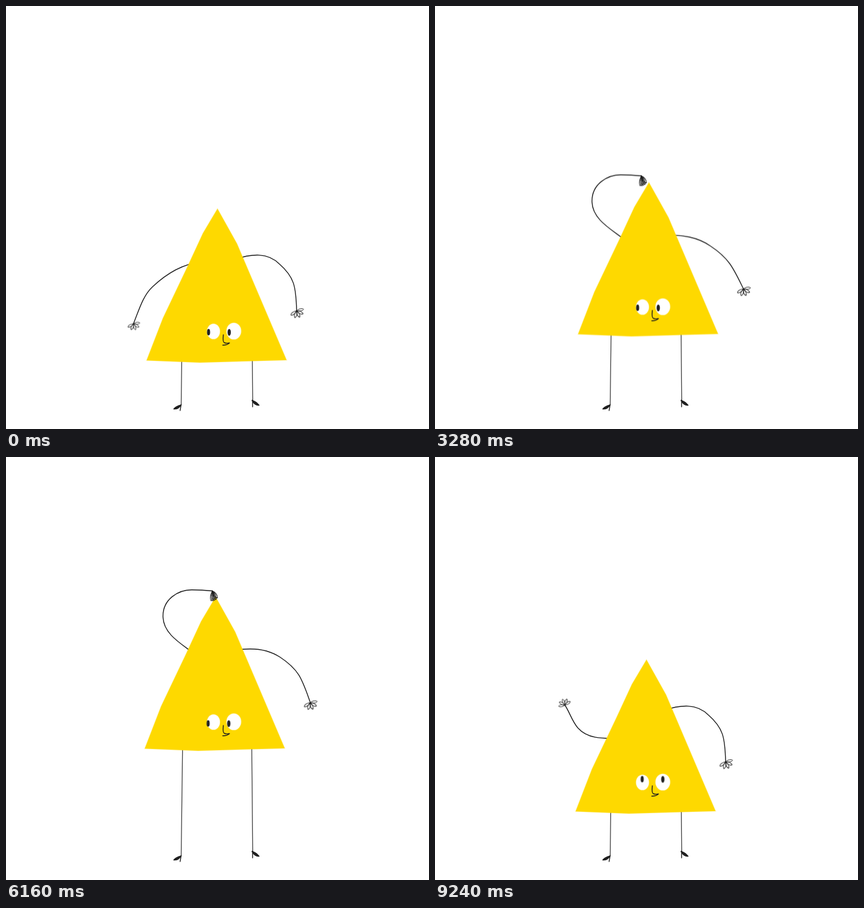
Recreate the animation shown at these times as an HTML page without scripts. Size 687x687 px, loop 9320 ms.

```html
<!DOCTYPE html>
<html lang="en">
<head>
<meta charset="utf-8">
<title>Stretching triangle</title>
<style>
@property --spread { syntax: "<angle>"; inherits: true; initial-value: 39deg; }

html, body { margin: 0; width: 100%; height: 100%; overflow: hidden; background: #fff; }
svg { display: block; width: 100vw; height: 100vh; }
.line { fill: none; stroke: #1d1d1d; stroke-width: 1.4; stroke-linecap: round; stroke-linejoin: round; }
.hand { stroke-width: 1; }
.leg { stroke: #444; stroke-width: 1.3; }
.ink { fill: #222; }
.soft { stroke-width: 1.6; stroke-opacity: .35; }
.finger { transform: rotate(calc(78deg + var(--i) * var(--spread))); }
.lift, .body, .pupils, .arm, .hand { animation: 9.32s ease-in-out infinite; }

.lift { animation-name: lift; animation-timing-function: linear; }
@keyframes lift {
  0%, 19.31% { transform: translateY(0); }
  27.04% { transform: translateY(-2px); }
  29.18% { transform: translateY(-15px); }
  39.48% { transform: translateY(-57px); }
  43.35% { transform: translateY(-76px); }
  49.79% { transform: translateY(-95px); }
  53% { transform: translateY(-99px); }
  57.51% { transform: translateY(-97px); }
  62% { transform: translateY(-95px); }
  66.09% { transform: translateY(-98px); }
  72% { transform: translateY(-99px); }
  78.11% { transform: translateY(-96px); }
  81.12% { transform: translateY(-98px); animation-timing-function: ease-out; }
  84.5% { transform: translateY(-112px); animation-timing-function: ease-in; }
  88% { transform: translateY(6px); }
  90% { transform: translateY(-3px); }
  91%, 100% { transform: translateY(0); }
}

.body { animation-name: wobble; }
@keyframes wobble {
  0%, 19.31% { transform: translate(0, 0); }
  22.5% { transform: translate(-15px, -2px); }
  27.04% { transform: translate(3px, -1px); }
  31% { transform: translate(-8px, -5px); }
  35% { transform: translate(4px, -3px); }
  39.5% { transform: translate(-8px, -7px); }
  43.35% { transform: translate(-2px, -7px); }
  46% { transform: translate(4px, -4px); }
  50.5% { transform: translate(-8px, -6px); }
  54% { transform: translate(4px, -4px); }
  57.51% { transform: translate(-7px, -6px); }
  62% { transform: translate(4px, -4px); }
  66.09% { transform: translate(-3px, -4px); }
  69% { transform: translate(-8px, -6px); }
  72.5% { transform: translate(4px, -3px); }
  75.5% { transform: translate(-8px, -5px); }
  78.11% { transform: translate(-.7px, -3.5px); }
  81% { transform: translate(3px, -3px); }
  86%, 100% { transform: translate(0, 0); }
}

.pupils { animation-name: roll; animation-timing-function: linear; }
@keyframes roll {
  0%, 4.72% { transform: translate(-8px, 1px); }
  11.16%, 19.31% { transform: translate(-.5px, -5.5px); }
  23% { transform: translate(6px, 0); }
  27.04% { transform: translate(0, 5.5px); }
  35% { transform: translate(-8px, 1px); }
  43.35% { transform: translate(-4.7px, -3.5px); }
  45.5% { transform: translate(-.5px, -5.5px); }
  51% { transform: translate(6px, 0); }
  57.51% { transform: translate(0, 5.5px); }
  66.09% { transform: translate(-8.7px, 2px); }
  78.11%, 100% { transform: translate(-.5px, -5.5px); }
}

.arm.left { animation-name: left-arm; }
@keyframes left-arm {
  0%, 4.72% { d: path("M315 416C280 420 254 441 238 456C222 471 216 494 207 516"); }
  7.5% { d: path("M315 417C250 420 180 412 140 406C100 400 70 396 46 392"); }
  11.16%, 81.12% { d: path("M310 421C290 404 256 388 255 358C254 329 280 313.500 302 313.700C312 313.800 325 314.500 335 315.500"); }
  84.5% { d: path("M310 425C280 400 240 370 225 345C210 325 200 312 192 300"); }
  88% { d: path("M304 452C270 452 240 445 222 424C210 410 204 395 196 380"); }
  91%, 100% { d: path("M300 456.500C270 458 247 457 232 440C222 428 219 415 211 403"); }
}

.hand.left { animation-name: left-hand; }
@keyframes left-hand {
  0%, 4.72% { transform: translate(207px, 516px) rotate(0deg) scale(.9, .9); --spread: 39deg; }
  7.5% { transform: translate(46px, 392px) rotate(95deg) scale(.9, .9); --spread: 39deg; }
  11.16%, 81.12% { transform: translate(335px, 315.5px) rotate(360deg) scale(1, 1.4); --spread: 14deg; }
  84.5% { transform: translate(192px, 300px) rotate(510deg) scale(.9, .9); --spread: 39deg; }
  88% { transform: translate(196px, 380px) rotate(520deg) scale(.9, .9); --spread: 39deg; }
  91%, 99.13% { transform: translate(211px, 403px) rotate(540deg) scale(.9, .9); --spread: 39deg; }
  99.14%, 100% { transform: translate(211px, 403px) rotate(537deg) scale(.9, .9); --spread: 39deg; }
}

.arm.right { animation-name: right-arm; }
@keyframes right-arm {
  0%, 4.72% { d: path("M370 412C400 402 425 400 444 419C468 440 471 455 472 495"); }
  11.16%, 27.04% { d: path("M375 413C400 413 430 421 450 436C480 456 489 473 508 502"); }
  43.35%, 81.12% { d: path("M372 412C400 407 425 410 445 423C477 444 481 460 494 496"); }
  86% { d: path("M372 412C400 405 440 405 470 405C500 403 525 402 544 398"); }
  91%, 100% { d: path("M370 412C400 402 425 400 444 419C468 440 471 455 472 495"); }
}

.hand.right { animation-name: right-hand; }
@keyframes right-hand {
  0%, 4.72% { transform: translate(472px, 495px) rotate(-6deg); }
  11.16%, 27.04% { transform: translate(508px, 501px) rotate(0deg); }
  43.35%, 81.12% { transform: translate(494px, 497px) rotate(-3deg); }
  86% { transform: translate(544px, 398px) rotate(-90deg); }
  91%, 100% { transform: translate(472px, 495px) rotate(-6deg); }
}
</style>
</head>
<body>
<svg viewBox="0 0 687 687">
  <defs>
    <path id="finger" d="M0 0C4-3 9-3.500 11.500-1.500C10 1.500 5 1.500 0 0"/>
    <g id="fingers">
      <use class="finger" href="#finger" style="--i: -2"/>
      <use class="finger" href="#finger" style="--i: -1"/>
      <use class="finger" href="#finger" style="--i: 0"/>
      <use class="finger" href="#finger" style="--i: 1"/>
      <use class="finger" href="#finger" style="--i: 2"/>
    </g>
  </defs>

  <path class="line leg" d="M287 454Q285.500 560 284.500 648M399 454Q399.800 570 400.700 642"/>
  <path class="line" d="M284.500 647L282.800 657M400.500 640V651"/>
  <path class="line ink" d="M272.500 654.500Q277 649.500 284.500 648Q280 655 272.500 654.500ZM399.500 640.500Q407 643 411 648.500Q403 648.500 399.500 640.500Z"/>

  <g class="lift">
    <path class="line arm left" d="M315 416C280 420 254 441 238 456C222 471 216 494 207 516"/>
    <path class="line arm right" d="M370 412C400 402 425 400 444 419C468 440 471 455 472 495"/>
    <path class="body soft" fill="#fed900" stroke="#fed900" d="M343.500 329.500L320 369L295 423L255 507L228.500 575.500L315 579L400 576.500L455.500 575L375 386Z"/>
    <g class="soft" fill="#fff" stroke="#fff">
      <ellipse cx="337" cy="528.500" rx="10.300" ry="12.300"/>
      <ellipse cx="370" cy="528" rx="11.700" ry="13.300"/>
    </g>
    <g class="pupils ink">
      <ellipse cx="337" cy="528.700" rx="2.500" ry="5.200"/>
      <ellipse cx="370.500" cy="529" rx="2.700" ry="5.500"/>
    </g>
    <path class="line" d="M353 534Q351.500 546 355 547Q358 548 363 547.300Q359 551 352 550.700"/>
    <use class="line hand left" href="#fingers"/>
    <use class="line hand right" href="#fingers"/>
  </g>
</svg>
</body>
</html>
```
